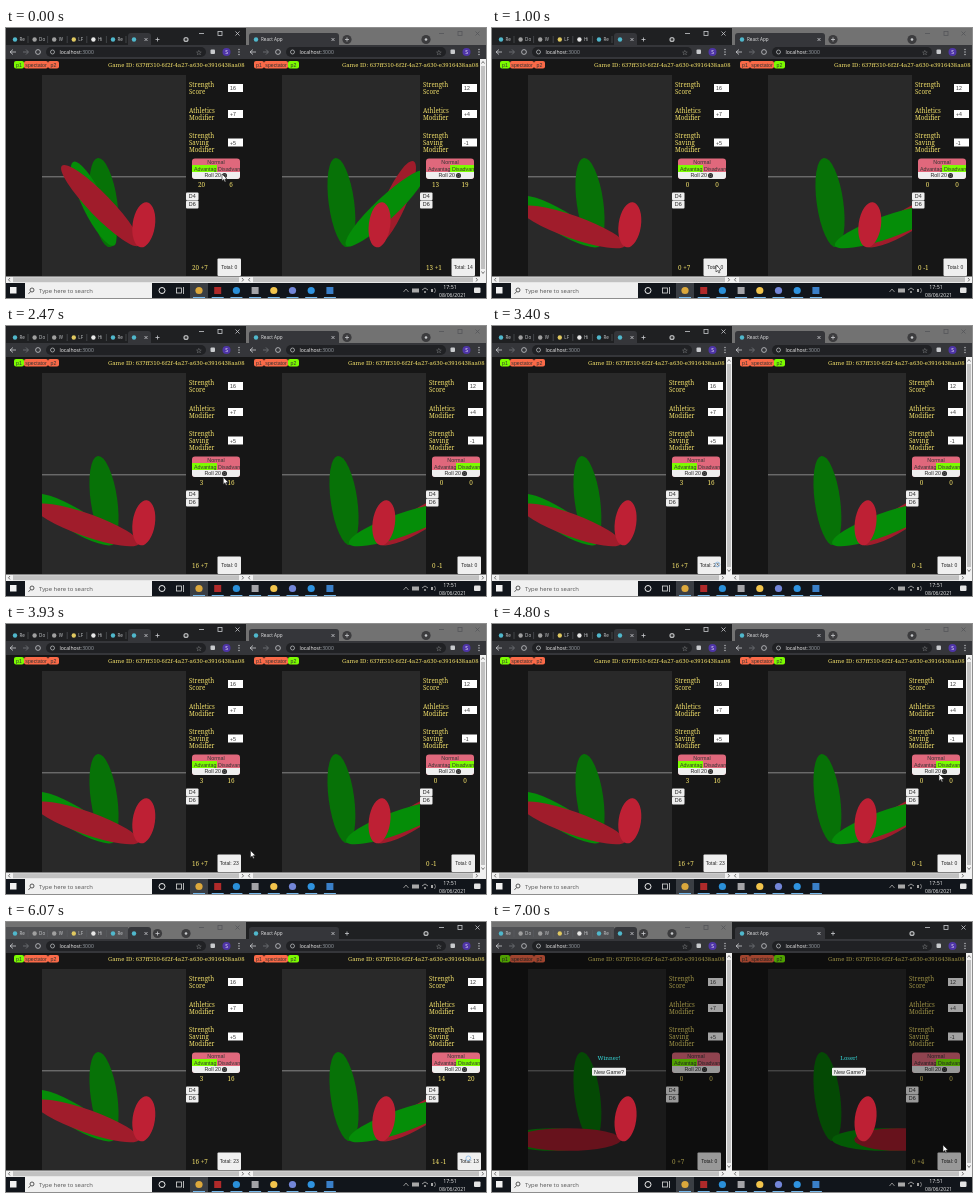
An HTML page with a canvas for the animation above (7.07 s loop, 480 by 270 pixels).

```html
<!DOCTYPE html>
<html lang="en">
<head>
<meta charset="utf-8">
<title>Arm wrestling game</title>
<style>
html, body { margin: 0; width: 100%; height: 100%; overflow: hidden; background: #181818; }
canvas { display: block; width: 480px; height: 270px; }
</style>
</head>
<body>
<canvas id="stage" width="480" height="270"></canvas>
<script>
const LOOP = 7070;
const SERIF = 'Georgia, "Noto Serif", serif';
const SANS = '"Liberation Sans", Arial, sans-serif';
const UI = '"Open Sans", "Noto Sans", sans-serif';
const KHAKI = '#f0de6a', LIME = '#7cfc00', TOMATO = '#fa6a48', ROSE = '#e0687c';
const ctx = document.getElementById('stage').getContext('2d');

// [time, changes]; l = left player, r = right player; lean = [long arm, short arm] in degrees
const steps = [
  [0, {
    focus: 'l', busy: false, over: false,
    l: { lean: [46, 64], dice: [20, 6], sum: '20 +7', total: 0, bar: false },
    r: { lean: [42, 65], dice: [13, 19], sum: '13 +1', total: 14, bar: true }
  }],
  [690, { l: { total: 27 } }],
  [870, {
    l: { lean: [19.5, 31], dice: [0, 0], sum: '0 +7', total: 0 },
    r: { lean: [19.5, 31], dice: [0, 0], sum: '0 -1', total: 0, bar: false }
  }],
  [2200, { l: { dice: [3, 16], sum: '16 +7' } }],
  [3070, { busy: true, l: { total: 23, bar: true }, r: { bar: true } }],
  [3600, { busy: false, l: { bar: false } }],
  [4870, { focus: 'r' }],
  [5000, { r: { dice: [14, 20], sum: '14 -1', bar: false } }],
  [5870, { busy: true, r: { total: 13 } }],
  [6130, {
    busy: false, over: true,
    l: { lean: [0, 0], dice: [0, 0], sum: '0 +7', total: 0, bar: true },
    r: { lean: [0, 0], dice: [0, 0], sum: '0 +4', total: 0, bar: true }
  }]
];

// pointer path: [time, x, y]
const path = [
  [0, 216, 146], [70, 216, 146], [730, 224, 237], [1600, 224, 237],
  [2200, 217, 147], [2400, 217, 147], [2930, 222, 235], [3800, 222, 235],
  [4470, 447, 150], [5270, 447, 150], [5870, 459, 233], [6670, 458, 232],
  [7000, 451, 223], [LOOP, 451, 223]
];

function stateAt(t) {
  const s = { l: {}, r: {} };
  for (const [at, change] of steps) {
    if (at > t) break;
    const { l, r, ...rest } = change;
    Object.assign(s, rest);
    Object.assign(s.l, l);
    Object.assign(s.r, r);
  }
  return s;
}

function pointerAt(t) {
  const i = Math.max(1, path.findIndex(p => p[0] > t));
  const a = path[i - 1], b = path[i];
  const u = (t - a[0]) / (b[0] - a[0]);
  const e = u * u * (3 - 2 * u);
  return [a[1] + (b[1] - a[1]) * e, a[2] + (b[2] - a[2]) * e];
}

function rect(x, y, w, h, fill, radius = 0) {
  ctx.fillStyle = fill;
  ctx.beginPath();
  ctx.roundRect(x, y, w, h, radius);
  ctx.fill();
}

function dot(x, y, r, fill) {
  ctx.fillStyle = fill;
  ctx.beginPath();
  ctx.arc(x, y, r, 0, Math.PI * 2);
  ctx.fill();
}

function ring(x, y, r, color, width = 1) {
  ctx.strokeStyle = color;
  ctx.lineWidth = width;
  ctx.beginPath();
  ctx.arc(x, y, r, 0, Math.PI * 2);
  ctx.stroke();
}

function line(color, width, ...pts) {
  ctx.strokeStyle = color;
  ctx.lineWidth = width;
  ctx.beginPath();
  for (let i = 0; i < pts.length; i += 2) ctx.lineTo(pts[i], pts[i + 1]);
  ctx.stroke();
}

function text(str, x, y, size, color, font = SANS, align = 'left') {
  ctx.font = `${size}px ${font}`;
  ctx.fillStyle = color;
  ctx.textAlign = align;
  ctx.textBaseline = 'alphabetic';
  ctx.fillText(str, x, y);
}

function cross(x, y, r, color) {
  line(color, 0.8, x - r, y - r, x + r, y + r);
  line(color, 0.8, x - r, y + r, x + r, y - r);
}

function oval(x, y, rx, ry, deg, fill) {
  ctx.fillStyle = fill;
  ctx.beginPath();
  ctx.ellipse(x, y, rx, ry, deg * Math.PI / 180, 0, Math.PI * 2);
  ctx.fill();
}

// An arm pivots at its elbow; dir is -1 for left, 1 for right.
function arm(x, len, deg, dir, fill) {
  const a = deg * Math.PI / 180;
  oval(x + dir * Math.cos(a) * len / 2, 217.5 - Math.sin(a) * len / 2,
    len / 2, 11.3, -dir * deg, fill);
}

function tabs(left, active) {
  rect(0, 0, 240, 18, active ? '#1f2022' : '#727272');
  const ink = '#c8cacd';
  if (left) {
    const labels = ['Re', 'Do', 'W', 'LF', 'Hi', 'Re'];
    const tints = ['#50b8cc', '#a0a0a0', '#a0a0a0', '#e0c860', '#e8e8e8', '#50b8cc'];
    rect(0, 5, 122, 13, active ? '#1f2022' : '#505154');
    labels.forEach((label, i) => {
      const x = 9 + i * 19.6;
      dot(x, 11.5, 2.2, tints[i]);
      text(label, x + 4.5, 13.3, 4.5, ink, UI);
      line('#5c5f63', 0.6, x + 13, 8, x + 13, 15);
    });
    rect(122, 5, 23, 13, '#35363a', [3, 3, 0, 0]);
    dot(128, 11.5, 2.2, '#50b8cc');
    cross(140, 11.5, 1.5, ink);
  } else {
    rect(3, 5, 90, 13, '#35363a', [3, 3, 0, 0]);
    dot(10, 11.5, 2.2, '#50b8cc');
    text('React App', 15, 13.3, 4.6, '#e4e5e6', UI);
    cross(87, 11.5, 1.5, ink);
  }
  const px = left ? 151.5 : 101;
  if (!active) dot(px, 11.5, 4.6, '#3c3c3e');
  dot(180, 11.5, active ? 2.6 : 4.6, active ? '#b4b6b8' : '#3c3c3e');
  dot(180, 11.5, 1.3, active ? '#333' : ink);
  line(ink, 0.8, px - 2, 11.5, px + 2, 11.5);
  line(ink, 0.8, px, 9.5, px, 13.5);
  const frame = active ? ink : '#55565a';
  line(frame, 0.8, 193, 5.5, 198, 5.5);
  ctx.strokeRect(212, 3.5, 4, 4);
  cross(231.5, 5.5, 2, frame);
}

function addressBar() {
  rect(0, 17, 240, 14, '#35363a');
  rect(40, 19, 160, 10, '#202124', 5);
  const ink = '#c8cacd';
  line(ink, 0.8, 10, 24, 4, 24);
  line(ink, 0.8, 7, 21.5, 4, 24, 7, 26.5);
  line('#75787c', 0.8, 17, 24, 22, 24);
  line('#75787c', 0.8, 20, 21.5, 22.5, 24, 20, 26.5);
  ring(32, 24, 2.4, ink, 0.8);
  ring(46.5, 24, 2, ink, 0.7);
  text('localhost', 53.5, 26, 5.1, '#f0f0f0', UI);
  text(':3000', 53.5 + ctx.measureText('localhost').width, 26, 5.1, '#9aa0a6', UI);
  text('☆', 193, 26.5, 7, ink, '"DejaVu Sans", sans-serif', 'center');
  rect(204.5, 21.5, 4.5, 4.5, ink, 1);
  dot(220.5, 24, 4, '#4f35a8');
  text('S', 220.5, 25.8, 5, '#fff', UI, 'center');
  for (const y of [21.5, 24, 26.5]) dot(233, y, 0.7, ink);
}

function button(label, x, y, w, h, size = 5.4) {
  rect(x, y, w, h, '#efefef', 1);
  text(label, x + w / 2, y + h / 2 + size * 0.36, size, '#222', SANS, 'center');
}

function scene(left, w, lean, over) {
  const [long, short] = lean;
  const dir = left ? -1 : 1;
  ctx.save();
  ctx.beginPath();
  ctx.rect(36, 47, w, 201);
  ctx.clip();
  rect(36, 47, w, 201, '#292929');
  line('#858585', 1, 36, 148.8, 36 + w, 148.8);
  ctx.translate(36, 0);
  ctx.scale(w / 144, 1);
  oval(62, 174.5, 13.3, 45, -8, '#077207');
  const green = () => left ? arm(72, 93, short, dir, '#058d08') : arm(67, 111, long, dir, '#058d08');
  const red = () => left ? arm(97, 111, long, dir, '#a01c2b') : arm(over ? 90 : 98, 93, short, dir, '#a01c2b');
  if (left || over) { green(); red(); } else { red(); green(); }
  ctx.restore();
}

function smallOval(w) {
  ctx.save();
  ctx.translate(36, 0);
  ctx.scale(w / 144, 1);
  oval(101.8, 196.8, 11.2, 22.7, 8, '#be2034');
  ctx.restore();
}

function page(left, p, s) {
  const w = p.bar ? 138 : 144;
  const d = 36 + w;
  rect(0, 31, 240, 218, '#161616');

  [['p1', 8, 10, left], ['spectator', 18, 24, false], ['p2', 42, 11, !left]].forEach(([name, x, pw, on]) => {
    rect(x, 33, pw, 7.5, on ? LIME : TOMATO, 2);
    text(name, x + pw / 2, 38.6, 5.2, '#333', SANS, 'center');
  });
  text('Game ID: 637ff310-6f2f-4a27-a630-e3916438aa08', d + 58.5, 38.8, 5.95, KHAKI, SERIF, 'right');

  scene(left, w, p.lean, s.over);

  const labels = [['Strength', 59], ['Score', 66], ['Athletics', 85], ['Modifier', 92],
    ['Strength', 110], ['Saving', 117], ['Modifier', 124]];
  for (const [str, y] of labels) text(str, d + 3, y, 6.2, KHAKI, SERIF);
  const mods = left ? ['16', '+7', '+5'] : ['12', '+4', '-1'];
  mods.forEach((m, i) => {
    const y = [56, 82, 110.5][i];
    rect(d + 42, y, 15, 8, '#fff');
    text(m, d + 44, y + 6, 5.2, '#333');
  });

  rect(d + 6, 130.5, 48, 20.5, ROSE, 3);
  rect(d + (left ? 6 : 30), 137, left ? 25 : 24, 7, LIME);
  rect(d + 6, 144, 48, 7, '#efefef', [0, 0, 3, 3]);
  text('Normal', d + 30, 136, 5.4, '#333', SANS, 'center');
  text('Advantag', d + 8, 142.5, 5.3, '#333');
  text('Disadvan', d + 32, 142.5, 5.3, '#333');
  text('Roll 20', d + 18.5, 149.4, 5.3, '#222');
  dot(d + 38.5, 147.5, 2.5, '#222');
  ring(d + 38.5, 147.5, 1.2, '#999', 0.5);

  text(p.dice[0], d + 15.5, 159.3, 6.4, KHAKI, SERIF, 'center');
  text(p.dice[1], d + 45, 159.3, 6.4, KHAKI, SERIF, 'center');
  button('D4', d, 164.5, 12.5, 7.8);
  button('D6', d, 172.6, 12.5, 7.8);
  text(p.sum, d + 6, 242, 6.3, KHAKI, SERIF);
  button('Total: ' + p.total, d + 31.5, 230.5, 23.5, 17.5, 5);

  if (s.over) rect(0, 31, 240, 218, 'rgba(0,0,0,.36)');
  smallOval(w);
  if (s.over) {
    text(left ? 'Winner!' : 'Loser!', 117, 138, 5.8, '#35d8d8', SERIF, 'center');
    button('New Game?', 100, 145.8, 34, 8);
  }

  if (p.bar) {
    rect(234, 31, 6, 218, '#f1f1f1');
    rect(235, 38, 4, 203, '#c1c1c1');
    line('#555', 0.8, 235.5, 35.5, 237, 33.5, 238.5, 35.5);
    line('#555', 0.8, 235.5, 243.5, 237, 245.5, 238.5, 243.5);
  }
  const end = p.bar ? 231 : 237;
  rect(0, 248.5, 240, 6.5, '#f1f1f1');
  rect(7, 249.3, end - 11, 5, '#c1c1c1');
  line('#555', 0.8, 4, 250, 2.5, 251.8, 4, 253.5);
  line('#555', 0.8, end - 1, 250, end + 0.5, 251.8, end - 1, 253.5);
}

function browser(left, s) {
  ctx.save();
  ctx.translate(left ? 0 : 240, 0);
  ctx.beginPath();
  ctx.rect(0, 0, 240, 255);
  ctx.clip();
  tabs(left, s.focus === (left ? 'l' : 'r'));
  addressBar();
  page(left, left ? s.l : s.r, s);
  ctx.restore();
}

function taskbar() {
  rect(0, 255, 480, 15, '#11151b');
  rect(4, 259, 6.5, 6.5, '#f2f2f2');
  rect(19, 255, 127, 15, '#f0f0f0');
  ring(26, 262, 2, '#333', 0.8);
  line('#333', 0.8, 24.5, 263.7, 22.5, 265.8);
  text('Type here to search', 33, 264.8, 5.9, '#555', UI);
  ring(156, 262.5, 3, '#eee');
  ctx.strokeStyle = '#ddd';
  ctx.lineWidth = 0.8;
  ctx.strokeRect(170.5, 260, 5, 5);
  line('#ddd', 0.8, 177.5, 259, 177.5, 266);
  rect(184, 255, 18, 15, '#3a3e44');
  const icons = ['#dca83c', '#b02a2a', '#2a8fd8', '#a4a4a8', '#f2c44c', '#7386d8', '#2f93e0', '#3a7fc8'];
  icons.forEach((c, i) => {
    const x = 193 + i * 18.7;
    if (i % 2 && i !== 5) rect(x - 3.5, 259, 7, 7, c);
    else dot(x, 262.5, 3.6, c);
    rect(x - 6, 269, 12, 1, '#76b9ed');
  });
  const ink = '#a8a8a8';
  line(ink, 0.8, 397.5, 264, 400, 261, 402.5, 264);
  rect(406, 260.5, 7, 4, ink);
  line(ink, 0.9, 416, 262, 419, 260, 422, 262);
  dot(419, 264, 1, ink);
  rect(425, 261, 2, 3, ink);
  line(ink, 0.7, 428.5, 260, 429.5, 262.5, 428.5, 265);
  text('17:51', 444, 261.3, 5.3, '#eee', UI, 'center');
  text('08/06/2021', 446.5, 268.8, 5.1, '#eee', UI, 'center');
  rect(468, 259.5, 6.5, 5.5, '#e4e4e4', 1);
}

function pointer(x, y, busy) {
  if (busy) {
    ring(x + 3.5, y + 3.5, 2.4, '#9cc4ea', 1);
    return;
  }
  ctx.save();
  ctx.translate(x, y);
  ctx.fillStyle = '#fff';
  ctx.strokeStyle = '#222';
  ctx.lineWidth = 0.6;
  ctx.beginPath();
  for (const [px, py] of [[0, 0], [0, 7], [1.7, 5.5], [2.8, 8], [3.9, 7.5], [2.8, 5.2], [5, 5]]) ctx.lineTo(px, py);
  ctx.closePath();
  ctx.fill();
  ctx.stroke();
  ctx.restore();
}

function draw(now) {
  const t = now % LOOP;
  const s = stateAt(t);
  browser(true, s);
  browser(false, s);
  taskbar();
  pointer(...pointerAt(t), s.busy);
}

const start = performance.now();
function tick() {
  draw(performance.now() - start);
  requestAnimationFrame(tick);
}
tick();
</script>
</body>
</html>
```
